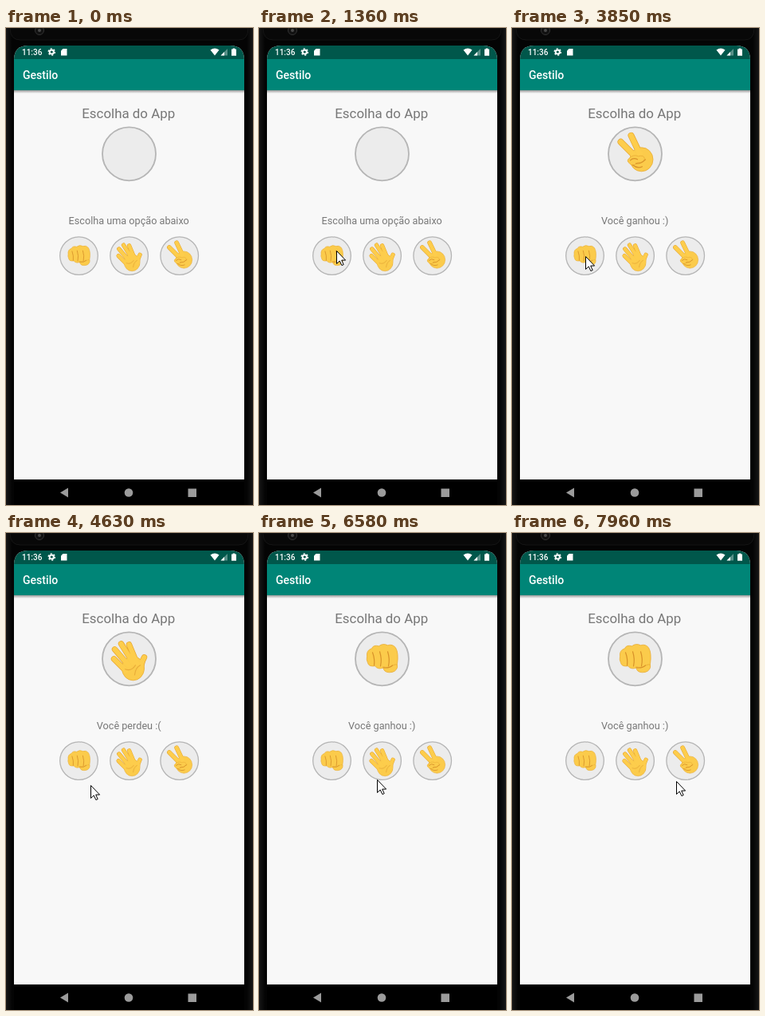
Write an HTML page that moves like this. It is 310x598 px and loops after 8000 ms.

```html
<!DOCTYPE html>
<html lang="pt-BR">
<head>
<meta charset="utf-8">
<style>
html, body { margin: 0; width: 100%; height: 100%; overflow: hidden; background: #050505; }
svg { display: block; width: 310px; height: 598px; }
text { font-family: Roboto, "Noto Sans", sans-serif; }
.label { fill: #777; text-anchor: middle; }
.ring { fill: #ececec; stroke: #b5b5b5; }
.skin { fill: #fbcb4b; stroke: #e9ad35; stroke-width: .8; }
.edge { fill: none; stroke: #e6a52f; stroke-linecap: round; }
.finger { fill: none; stroke: #fdcd4c; stroke-linecap: round; }
.crease { fill: none; stroke: #d8922a; stroke-width: 1.2; stroke-linecap: round; }
</style>
</head>
<body>
<svg viewBox="0 0 310 598">
  <defs>
    <linearGradient id="side"><stop stop-color="#171717"/><stop offset="1" stop-color="#030303"/></linearGradient>
    <linearGradient id="shadow" x2="0" y2="1"><stop stop-color="#999"/><stop offset="1" stop-color="#f8f8f8"/></linearGradient>
    <clipPath id="screen"><path d="M10 598V40Q10 22 28 22H281Q299 22 299 40V598Z"/></clipPath>

    <g id="rock">
      <path class="skin" d="M-19 -3Q-20 -11 -13 -13Q-11 -18 -4 -16Q1 -20 7 -17Q13 -19 17 -14Q21 -7 19 6Q19 12 14 12Q8 15 2 11Q-5 14 -9 9Q-17 10 -18 5Q-20 1 -19 -3Z"/>
      <path class="skin" d="M1 10Q9 12 14 8Q20 5 19 11Q17 17 9 17Q2 17 1 10Z"/>
      <path class="crease" d="M-12 -8Q-9 0 -10 8M-3 -9Q0 0 -2 9M7 -9Q10 0 8 9M2 11Q9 12 13 8"/>
    </g>
    <g id="paper">
      <path class="edge" stroke-width="7.4" d="M-19 0L-4 15M-18 -12L0 9M-10 -19L5 5M0 -18L10 6M19 -2Q15 5 15 14"/>
      <ellipse class="skin" cx="5" cy="12" rx="14" ry="15"/>
      <path class="finger" stroke-width="6" d="M-19 0L-4 15M-18 -12L0 9M-10 -19L5 5M0 -18L10 6M19 -2Q15 5 15 14"/>
      <path class="crease" stroke-opacity=".55" d="M-5 13Q3 16 8 8M14 8Q8 11 7 20"/>
    </g>
    <g id="scissors">
      <path class="edge" stroke-width="8" d="M-18 -15L2 5M-5 -23L6 0"/>
      <ellipse class="skin" cx="8" cy="7" rx="14.5" ry="15"/>
      <path class="finger" stroke-width="6.6" d="M-18 -15L2 5M-5 -23L6 0"/>
      <path class="skin" d="M-8 6Q-2 0 4 3Q11 1 12 6Q11 11 3 11Q-3 17 -7 12Q-11 9 -8 6Z"/>
      <path class="crease" d="M-6 8Q-2 4 3 7M1 12Q7 13 13 7M-3 14Q3 19 9 16"/>
    </g>
  </defs>

  <rect width="310" height="598" fill="#040404"/>
  <rect width="8" height="598" fill="url(#side)"/>
  <rect width="8" height="598" fill="url(#side)" transform="matrix(-1 0 0 1 310 0)"/>
  <path d="M5 0Q5 15 18 15H292Q304 15 304 0Z" fill="#080808" stroke="#151515"/>
  <circle cx="42" cy="3" r="5.5" fill="#111" stroke="#333"/>
  <circle cx="42" cy="3" r="2" fill="#484848"/>

  <g clip-path="url(#screen)">
    <path d="M10 22H299V566H10Z" fill="#f8f8f8"/>
    <path d="M10 22H299V39H10Z" fill="#00574b"/>
    <path d="M10 39H299V78H10Z" fill="#008577"/>
    <path d="M10 78H299V82H10Z" fill="url(#shadow)"/>
    <path d="M10 566H299V598H10Z"/>
  </g>

  <g fill="#fff">
    <text x="20" y="34" font-size="10" font-weight="500">11:36</text>
    <circle cx="57.3" cy="30" r="2.6" fill="none" stroke="#fff" stroke-width="2"/>
    <circle cx="57.3" cy="30" r="4.1" fill="none" stroke="#fff" stroke-width="1.4" stroke-dasharray="2.1 2.19"/>
    <path d="M71.5 26H76.5V34.5H69V28.5Z"/>
    <path d="M256.5 27.6Q262 23.5 267.5 27.6L262 34.5Z"/>
    <path d="M278 26V34.5H269.5Z" opacity=".35"/>
    <path d="M274 30V34.5H269.5Z"/>
    <path d="M283 26.5H284.7V25.5H287.3V26.5H289V34.7H283Z"/>
    <text x="21" y="64" font-size="14.06" font-weight="500">Gestilo</text>
  </g>

  <text class="label" x="153.7" y="112.5" font-size="16.9">Escolha do App</text>
  <text class="label" x="154.2" y="246" font-size="12.66" id="message"></text>
  <circle class="ring" cx="154.5" cy="157.8" r="33.5" stroke-width="1.8"/>
  <use id="choice" transform="translate(154.5 157.8)"/>
  <g id="options"></g>

  <g fill="#9b9b9b">
    <path d="M68 582.5L78 576.5V588.5Z"/>
    <circle cx="154" cy="582.5" r="5.3"/>
    <path d="M228.5 577.5H239V588H228.5Z"/>
  </g>

  <g id="cursor">
    <g id="press" fill="none">
      <circle r="11" stroke="#fff"/>
      <circle r="10" stroke="#000"/>
    </g>
    <path d="M.5 .5V16.5L4.2 13L6.9 18.6L9.2 17.6L6.7 12.1H11.6Z" fill="#fff" stroke="#000" stroke-width="1"/>
  </g>
</svg>
<script>
const LOOP = 8000;
const byId = id => document.getElementById(id);

byId('options').innerHTML = ['rock', 'paper', 'scissors'].map((hand, i) =>
  `<g transform="translate(${91.5 + 63.1 * i} 285.6)">
    <circle class="ring" r="23.8" stroke-width="1.3"/><use href="#${hand}" transform="scale(.71)"/></g>`).join('');

const rounds = [
  [0, '', 'Escolha uma opção abaixo'],
  [2290, 'scissors', 'Você ganhou :)'],
  [4000, 'paper', 'Você perdeu :('],
  [5710, 'rock', 'Você ganhou :)'],
];

// Pointer moves: first step, last step, step count, end point, optional bend
const moves = [
  [260, 580, 5, [119, 231]],
  [730, 890, 3, [98, 276]],
  [1040, 1120, 2, [97, 279]],
  [2840, 3080, 4, [110, 307]],
  [3160, 3380, 4, [92, 286]],
  [4000, 4000, 1, [93, 289]],
  [4550, 5160, 9, [153, 285], [121, 367]],
  [5710, 5860, 3, [150, 310]],
  [6580, 6580, 1, [148, 309]],
  [6650, 6810, 3, [147, 279]],
  [7190, 7420, 4, [148, 318]],
  [7820, 7960, 3, [206, 311], [175, 329]],
];
const presses = [[1280, 1360], [3680, 3850], [5470, 5640], [6960, 7040]];

function pointerAt(t) {
  let from = [254, 680];
  for (const [start, end, steps, to, bend] of moves) {
    if (t < start) break;
    const step = steps > 1 ? Math.floor((t - start) / (end - start) * (steps - 1) + .01) : 0;
    const p = Math.min(1, (step + 1) / steps), q = 1 - p;
    from = from.map((a, i) => {
      const mid = bend ? bend[i] : (a + to[i]) / 2;
      return Math.round(q * q * a + 2 * p * q * mid + p * p * to[i]);
    });
  }
  return from;
}

let shown;
function draw(now) {
  const t = now % LOOP;
  const round = rounds.findLast(r => t >= r[0]);
  if (round !== shown) {
    shown = round;
    byId('choice').setAttribute('href', '#' + round[1]);
    byId('message').textContent = round[2];
  }
  byId('cursor').setAttribute('transform', `translate(${pointerAt(t)})`);
  byId('press').setAttribute('visibility',
    presses.some(([down, up]) => t >= down && t < up) ? 'visible' : 'hidden');
}

const begin = performance.now();
function tick() {
  draw(performance.now() - begin);
  requestAnimationFrame(tick);
}
tick();
</script>
</body>
</html>
```
